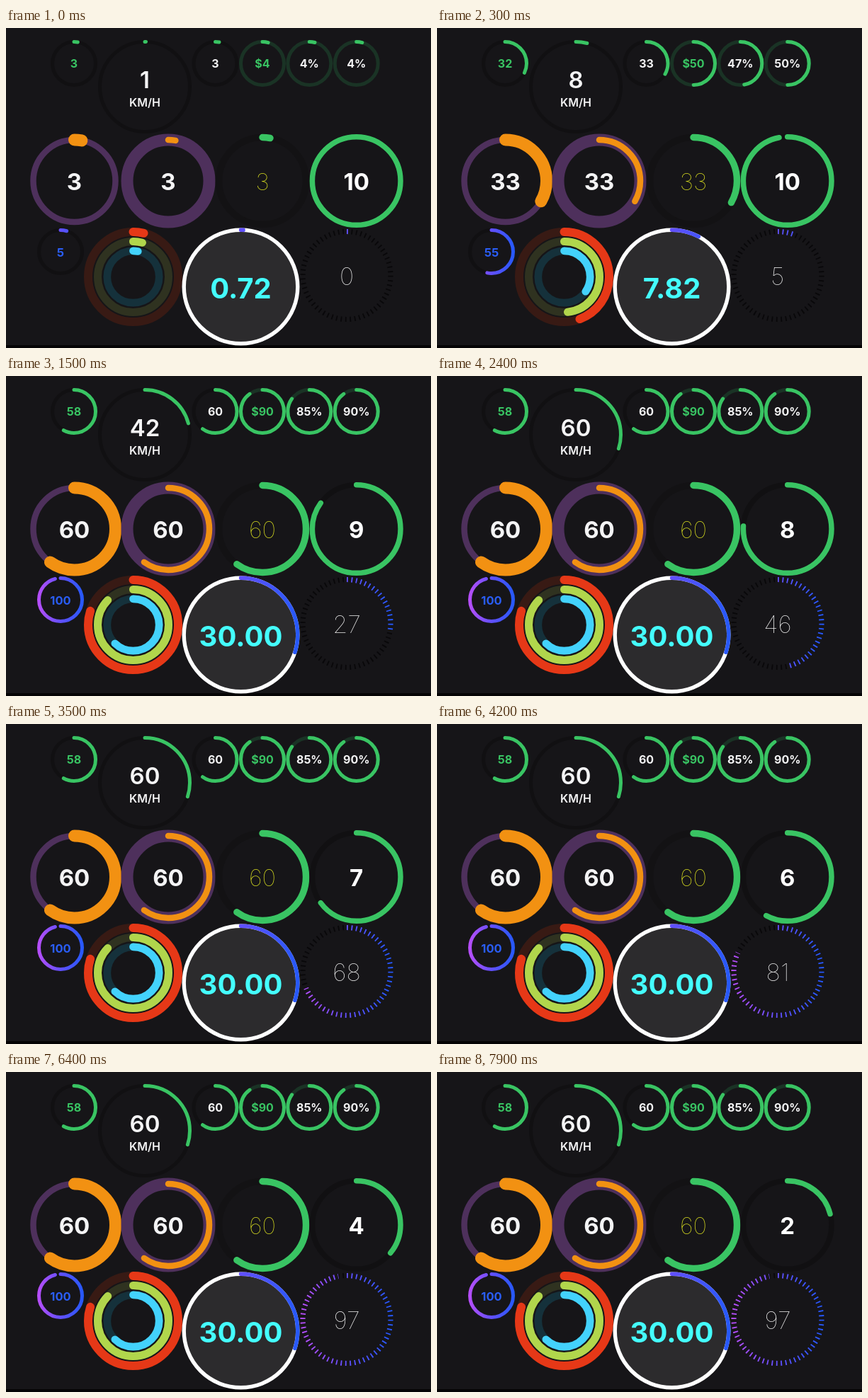
These frames come from a looping animation (600x452 px, 8 s). An HTML page with a canvas:

```html
<!DOCTYPE html>
<html lang="en">
<head>
<meta charset="utf-8">
<title>Progress rings</title>
<style>
html, body { margin: 0; width: 100%; height: 100%; overflow: hidden; background: #161518; }
canvas { display: block; width: 600px; height: 452px; }
</style>
</head>
<body>
<canvas id="stage"></canvas>
<script>
const W = 600, H = 452, LOOP = 8000, STEP = 100, LEAD = 32.3;
const GREEN = '#39c463', ORANGE = '#f29112', PLUM = '#4e305c', DARK = '#111012',
      MOSS = '#1a3325', WHITE = '#f4f4f5', BLUE = '#2a5df5';

const canvas = document.getElementById('stage');
const scale = window.devicePixelRatio || 1;
canvas.width = W * scale;
canvas.height = H * scale;
const ctx = canvas.getContext('2d');
ctx.scale(scale, scale);

// Gentle ease-in-out from 0 to 1 over the given duration.
function progress(t, duration) {
  const x = Math.min(1, (t + LEAD) / duration);
  return x - 0.11 * Math.sin(2 * Math.PI * x) / (2 * Math.PI);
}

function arc(x, y, r, width, color, part = 1, cap = 'round') {
  if (part <= 0) return;
  ctx.beginPath();
  ctx.arc(x, y, r, -Math.PI / 2, -Math.PI / 2 + 2 * Math.PI * part);
  ctx.lineWidth = width;
  ctx.lineCap = part >= 1 ? 'butt' : cap;
  ctx.strokeStyle = color;
  ctx.stroke();
}

function label(text, x, y, size, color, weight = 700) {
  ctx.font = `${weight} ${size}px Inter, Roboto, sans-serif`;
  ctx.textAlign = 'center';
  ctx.fillStyle = color;
  ctx.fillText(text, x, y + size * 0.3635);
}

function violet(x, r) {
  const g = ctx.createLinearGradient(x - r, 0, x + r, 0);
  g.addColorStop(0, '#bb4efa');
  g.addColorStop(0.5, '#6250fb');
  g.addColorStop(1, '#2459fa');
  return g;
}

// x, end value, end share of the circle, track, text colour, prefix, suffix
const smallRings = [
  [96, 58, 0.58, DARK, GREEN, '', ''],
  [295.5, 60, 0.6, DARK, WHITE, '', ''],
  [362, 90, 0.9, MOSS, GREEN, '$', ''],
  [428.3, 85, 0.85, MOSS, WHITE, '', '%'],
  [494.7, 90, 0.9, MOSS, WHITE, '', '%']
];

// x, radius, track width, track, arc width, arc colour, text colour, weight
const largeRings = [
  [96.5, 58, 8.5, PLUM, 17, ORANGE, WHITE, 700],
  [229, 58, 17, PLUM, 8.5, ORANGE, WHITE, 700],
  [362, 61.5, 9.5, '#131214', 9.5, GREEN, '#dfe420', 100]
];

// radius, width, track, colour, end share
const nested = [
  [63.5, 12, '#381a14', '#e63817', 0.8],
  [50, 11, '#2f3220', '#b1d64c', 0.873],
  [36.7, 10.7, '#15313b', '#43d2fc', 0.623]
];

function drawTopRow(t, quick) {
  for (const [x, value, share, track, color, prefix, suffix] of smallRings) {
    arc(x, 50, 30.5, 5, track);
    arc(x, 50, 30.5, 5, GREEN, share * quick);
    label(prefix + Math.round(value * quick) + suffix, x, 50.5, 16, color);
  }
  const p = progress(t, 2250);
  arc(196, 83, 63.5, 5, DARK);
  arc(196, 83, 63.5, 5, GREEN, 0.3 * p);
  label(Math.round(60 * p), 196, 72.7, 33, WHITE, 600);
  label('KM/H', 196, 105.2, 16, WHITE, 600);
}

function drawMiddleRow(t, quick) {
  for (const [x, r, trackWidth, track, width, color, ink, weight] of largeRings) {
    arc(x, 216, r, trackWidth, track);
    arc(x, 216, r, width, color, 0.6 * quick);
    label(Math.round(60 * quick), x, 217, 33, ink, weight);
  }
  const left = 10 - t / 1000;
  arc(494.7, 216, 62.3, 7.5, DARK);
  arc(494.7, 216, 62.3, 7.5, GREEN, left / 10);
  label(Math.round(left), 494.7, 217, 33, '#fff');
}

function drawBottomRow(t, quick) {
  arc(77, 316, 30.5, 5, DARK);
  arc(77, 316, 30.5, 5, violet(77, 33), 0.96 * quick);
  label(Math.round(100 * quick), 77, 316.7, 16.5, BLUE);

  for (const [r, width, track, color, share] of nested) {
    arc(179.5, 351.5, r, width, track);
    arc(179.5, 351.5, r, width, color, share * quick);
  }

  const p = progress(t, 1196.3);
  ctx.beginPath();
  ctx.arc(331.5, 365.5, 80, 0, 2 * Math.PI);
  ctx.fillStyle = '#2c2b2d';
  ctx.fill();
  arc(331.5, 365.5, 80.3, 5.4, '#fff');
  arc(331.5, 365.5, 80.3, 5.4, violet(331.5, 83), 0.3 * p);
  label((30 * p).toFixed(2), 331.5, 367.5, 40, '#44fdfd');

  const q = progress(t, 5100), r = 62, pitch = 2 * Math.PI * r / 60;
  ctx.setLineDash([1.9, pitch - 1.9]);
  arc(481, 349.5, r, 7.2, '#09080a', 1, 'butt');
  arc(481, 349.5, r, 7.2, violet(481, 66), 0.97 * q, 'butt');
  ctx.setLineDash([]);
  label(Math.floor(97 * q + 1e-6), 481, 350.7, 34, '#f0f0f0', 100);
}

function draw(t) {
  ctx.fillStyle = '#161518';
  ctx.fillRect(0, 0, W, H);
  ctx.fillStyle = '#050405';
  ctx.fillRect(0, 448, W, 4);
  const quick = progress(t, 605);
  drawTopRow(t, quick);
  drawMiddleRow(t, quick);
  drawBottomRow(t, quick);
}

const start = performance.now();
function tick() {
  const t = Math.max(0, performance.now() - start) % LOOP;
  draw(Math.floor(t / STEP) * STEP);
  requestAnimationFrame(tick);
}
tick();
</script>
</body>
</html>
```
